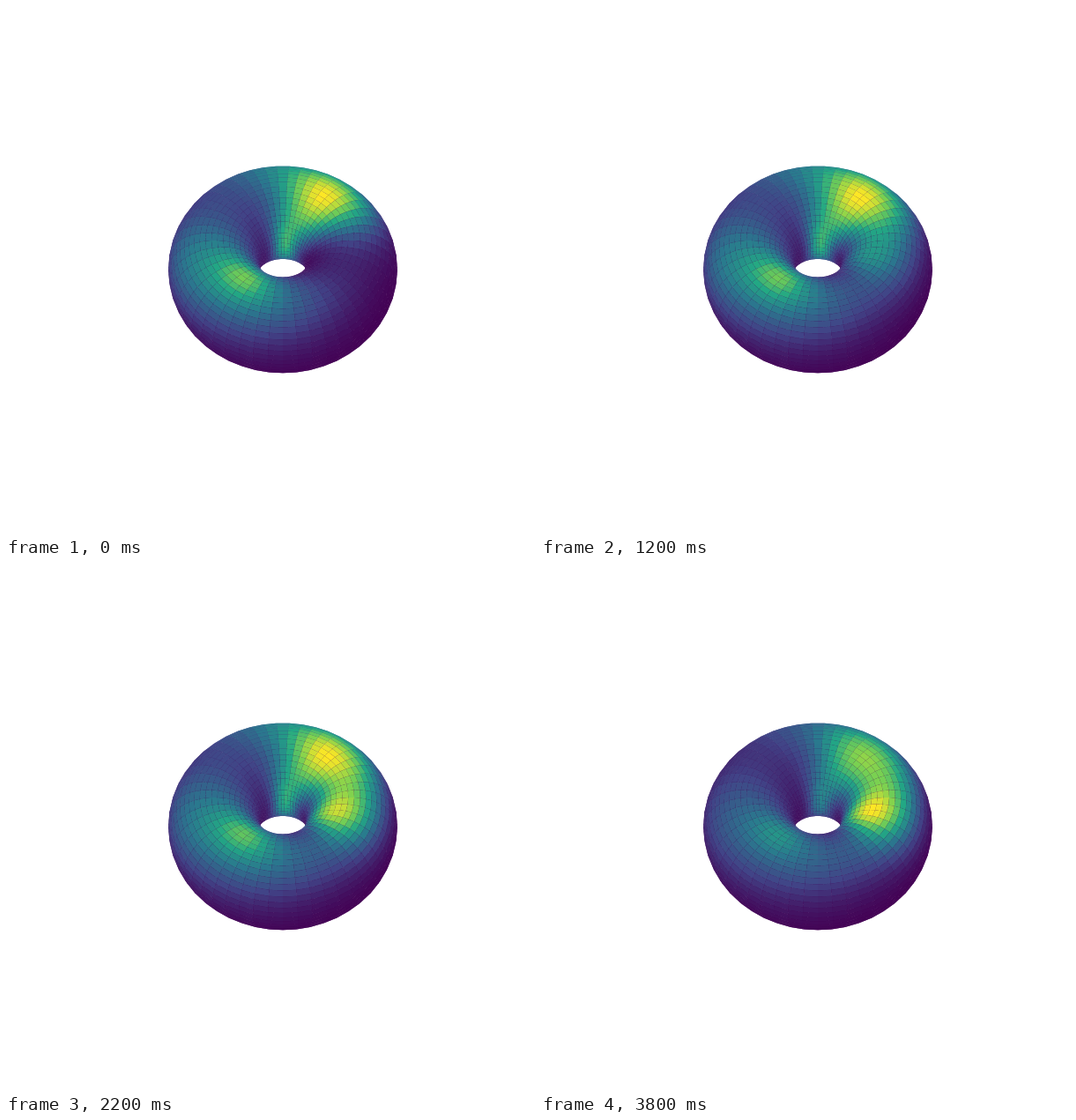
These frames come from a looping animation (600 px wide and 600 px high, 4000 ms). An HTML page with a canvas:

```html
<!DOCTYPE html>
<html lang="en">
<head>
<meta charset="utf-8">
<title>Density on a torus</title>
<style>
  html, body { margin: 0; width: 100%; height: 100%; overflow: hidden; background: #fff; }
  canvas { display: block; width: 600px; height: 600px; }
</style>
</head>
<body>
<canvas id="stage" width="600" height="600"></canvas>
<script>
const ctx = document.getElementById('stage').getContext('2d');
const RAD = Math.PI / 180;
const LOOP = 4000, STEP = 200;

// Torus and camera, in world units
const RING = 0.3117, TUBE = 0.2078, TALL = 0.2272;
const CELLS = 49;
const SIN = Math.sin(55 * RAD), COS = Math.cos(55 * RAD);
const CX = 314, CY = 297, ZOOM = 2497.3, DIST = 10;

const VIRIDIS = ['440154', '414487', '2a788e', '22a884', '7ad151', 'fde725']
  .map(h => [0, 2, 4].map(i => parseInt(h.slice(i, i + 2), 16)));

const clamp = v => Math.max(0, Math.min(1, v));
const mix = (a, b, u) => a + (b - a) * u;
const wrap = d => ((d + 180) % 360 + 360) % 360 - 180;

function smooth(t, start, end) {
  const u = clamp((t - start) / (end - start));
  return u * u * (3 - 2 * u);
}

const rise = t => smooth(t, 0, 2400);
const fade = t => smooth(t, 1700, 3900);

// A soft hill: centre and spread in degrees (around the ring, along the tube)
function hill(around, tube, spreadA, spreadT, from, to, ease) {
  return {
    shape: (a, b) => Math.exp(-.5 * ((wrap(a - around) / spreadA) ** 2 + (wrap(b - tube) / spreadT) ** 2)),
    height: t => mix(from, to, ease(t))
  };
}

const backdrop = {
  shape: (a, b) => (.5 - .5 * Math.cos((a - 20) * RAD)) * (.5 + .5 * Math.sin(b * RAD)),
  height: t => mix(.14, .09, fade(t))
};

const layers = [
  backdrop,
  hill(-51, 93, 26, 42, 1, .73, fade),       // upper right peak
  hill(20, 108, 21, 36, .06, .91, rise),     // growing right peak
  hill(-15, 97, 20, 32, .1, .32, rise),      // bridge between the two
  hill(134, 95, 42, 40, .5, .33, fade),      // left slope
  hill(128, 105, 18, 20, .27, .14, fade),    // left core
  hill(170, 40, 22, 28, .14, .08, fade),     // left rim
  hill(-85, 175, 22, 33, .6, .36, fade),     // far wall of the hole
  hill(-100, 50, 24, 45, .27, .17, fade),    // far rim
  hill(70, 80, 30, 30, .1, .14, rise)        // near slope
];

function colour(v) {
  const p = clamp(v) * (VIRIDIS.length - 1);
  const i = Math.min(VIRIDIS.length - 2, Math.floor(p));
  return `rgb(${VIRIDIS[i].map((c, k) => Math.round(mix(c, VIRIDIS[i + 1][k], p - i)))})`;
}

function project(around, tube) {
  const a = around * RAD, b = tube * RAD;
  const rho = RING + TUBE * Math.cos(b);
  const x = rho * Math.cos(a), front = rho * Math.sin(a), z = TALL * Math.sin(b);
  const depth = front * COS + z * SIN;
  const k = ZOOM / (DIST - depth);
  return { x: CX + x * k, y: CY + (front * SIN - z * COS) * k, depth };
}

function buildFaces() {
  const d = 360 / CELLS, faces = [];
  for (let i = 0; i < CELLS; i++) {
    for (let j = 0; j < CELLS; j++) {
      const a = 90 + i * d, b = j * d;
      const pts = [project(a, b), project(a + d, b), project(a + d, b + d), project(a, b + d)];
      faces.push({
        pts,
        depth: pts.reduce((s, p) => s + p.depth, 0),
        shares: layers.map(l => l.shape(a + d / 2, b + d / 2))
      });
    }
  }
  return faces.sort((p, q) => p.depth - q.depth);
}

const faces = buildFaces();

function draw(t) {
  const heights = layers.map(l => l.height(t));
  const values = faces.map(f => f.shares.reduce((s, v, i) => s + v * heights[i], 0));
  const top = Math.max(...values);
  ctx.fillStyle = '#fff';
  ctx.fillRect(0, 0, 600, 600);
  // Back to front; the soft cell edges let the far side show as a fine grid
  faces.forEach((f, n) => {
    ctx.fillStyle = colour(values[n] / top);
    ctx.beginPath();
    f.pts.forEach(p => ctx.lineTo(p.x, p.y));
    ctx.closePath();
    ctx.fill();
  });
}

let shown = -1;
function tick() {
  const step = Math.floor((performance.now() % LOOP) / STEP);
  if (step !== shown) {
    shown = step;
    draw(step * STEP);
  }
  requestAnimationFrame(tick);
}
tick();
</script>
</body>
</html>
```
